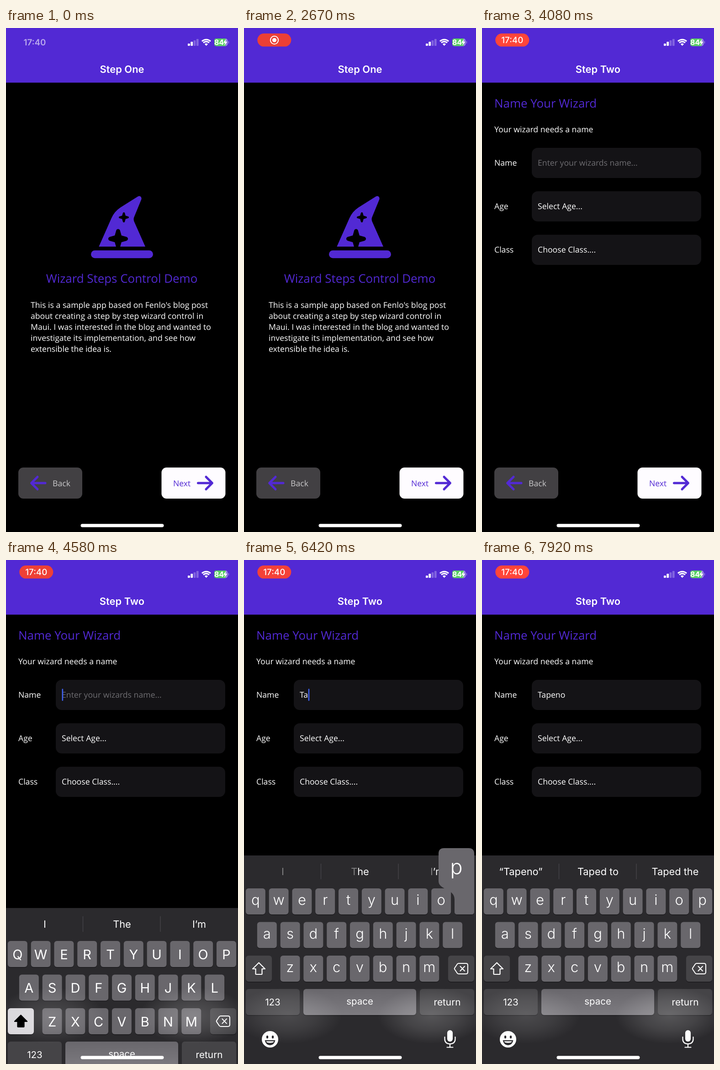
These frames come from a looping animation (508 by 1102 pixels, 8 s). An HTML page:

```html
<!DOCTYPE html>
<html lang="en">
<head>
<meta charset="utf-8">
<title>Wizard steps demo</title>
<style>
html, body { margin: 0; width: 100%; height: 100%; overflow: hidden; background: #000; }
svg { display: block; width: 100vw; height: 100vh; }
.ui { font-family: Inter, Roboto, sans-serif; }
.body { font-family: "Open Sans", "Noto Sans", sans-serif; }
text { white-space: pre; text-rendering: geometricPrecision; }
</style>
</head>
<body>
<svg id="stage" viewBox="0 0 508 1102" preserveAspectRatio="none"></svg>
<script>
const LOOP = 8000, PURPLE = '#5229d4', KEY = '#69676c', DARK_KEY = '#454447';
const BODY_SIZE = 17.65, HEADING_SIZE = 25.9;
const KEYBOARD_HEIGHT = 456, KEYBOARD_START = 4432;
const svg = document.getElementById('stage');
const $ = id => document.getElementById(id);

const clamp = v => Math.max(0, Math.min(1, v));
const ramp = (t, from, to) => clamp((t - from) / (to - from));
const smooth = p => p * p * (3 - 2 * p);

// Markup helpers
const rect = (x, y, w, h, r, fill, extra = '') =>
  `<rect x="${x}" y="${y}" width="${w}" height="${h}" rx="${r}" fill="${fill}" ${extra}/>`;
const label = (x, y, size, str, fill = '#fff', extra = '') =>
  `<text x="${x}" y="${y}" font-size="${size}" fill="${fill}" ${extra}>${str}</text>`;
const body = (x, y, str, fill, size = BODY_SIZE, extra = '') =>
  label(x, y, size, str, fill, `class="body" ${extra}`);
const ui = (x, y, size, str, fill, extra = '') =>
  label(x, y, size, str, fill, `class="ui" text-anchor="middle" ${extra}`);
const line = (d, color, width, extra = '') =>
  `<path d="${d}" fill="none" stroke="${color}" stroke-width="${width}" stroke-linecap="round" stroke-linejoin="round" ${extra}/>`;

function star(cx, cy, r) {
  const points = [];
  for (let i = 0; i < 8; i++) {
    const d = r * (i % 2 ? 0.255 : 0.8), a = i * Math.PI / 4;
    points.push(`${cx + d * Math.cos(a)},${cy + d * Math.sin(a)}`);
  }
  return `<polygon points="${points.join(' ')}" stroke="#000" stroke-width="${r * 0.4}" stroke-linejoin="round"/>`;
}

// Keyboard layout
const ROWS = [['qwertyuiop', 25.3, 718], ['asdfghjkl', 50.3, 791.5], ['zxcvbnm', 101, 865]];
const keys = ROWS.flatMap(([chars, x, y]) =>
  [...chars].map((ch, i) => ({ ch, x: x + i * 50.8, y })));

const keyCap = (x, y, w, fill, extra) =>
  rect(x, y + 1.5, w, 57, 6, '#1b1a1d') + rect(x, y, w, 57, 6, fill, extra);

function bubblePath({ x, y }) {
  const kl = x - 21.5, kr = x + 21.5, top = y - 88, bottom = y + 57;
  const br = Math.min(x + 39, 504), l = x > 470 ? kr - 78 : x - 39;
  return `M${l + 12} ${top}H${br - 12}Q${br} ${top} ${br} ${top + 12}V${y - 16}` +
    `C${br} ${y + 4} ${kr} ${y} ${kr} ${y + 24}V${bottom - 6}Q${kr} ${bottom} ${kr - 6} ${bottom}` +
    `H${kl + 6}Q${kl} ${bottom} ${kl} ${bottom - 6}V${y + 24}` +
    `C${kl} ${y} ${l} ${y + 4} ${l} ${y - 16}V${top + 12}Q${l} ${top} ${l + 12} ${top}Z`;
}
const bubbleCenter = k => k.x > 470 ? k.x - 17.5 : k.x;

// Static scene
const intro = [
  "This is a sample app based on Fenlo's blog post",
  'about creating a step by step wizard control in',
  'Maui. I was interested in the blog and wanted to',
  'investigate its implementation, and see how',
  'extensible the idea is.'
].map((s, i) => body(54, 612 + i * 24, s)).join('');

const pageOne = `<g id="pageOne">
  <path fill="${PURPLE}" d="M203.3 478L231 415.5Q237.5 401 250.5 392.5L289 368.3C293 365.8 298 369.5 296.3 375L280.3 414Q278.7 418 280.5 423L305 478Z"/>
  ${star(245.5, 461, 21.5)}${star(258, 414, 11)}
  ${rect(186, 486.3, 136, 17, 8.5, PURPLE)}
  ${body(253.5, 557, 'Wizard Steps Control Demo', PURPLE, HEADING_SIZE, 'text-anchor="middle"')}
  ${intro}</g>`;

const field = (y, name, value, fill, extra) =>
  body(27, y + 39, name) + rect(109, y, 371, 66, 13, '#141316') +
  body(122, y + 39, value, fill, BODY_SIZE, extra);

const pageTwo = `<g id="pageTwo">
  ${body(27, 174, 'Name Your Wizard', PURPLE, HEADING_SIZE)}
  ${body(27, 228, 'Your wizard needs a name')}
  ${field(262, 'Name', '', '#6e6d71', 'id="name"')}
  ${field(357, 'Age', 'Select Age...')}
  ${field(452, 'Class', 'Choose Class....')}
  ${rect(122, 281.5, 2.6, 26.5, 1.3, '#3f62f2', 'id="caret"')}</g>`;

const buttons =
  rect(27, 961, 140, 68, 11, '#424043') + body(102, 1002, 'Back', '#c9c8ca') +
  line('M86 995H56M69 981.5L55.5 995L69 1008.5', PURPLE, 5) +
  rect(340.5, 961, 140, 68, 11, '#fefcff') + body(366, 1002, 'Next', PURPLE) +
  line('M420.5 995H451M438 981.5L451.5 995L438 1008.5', PURPLE, 5);

const wifiArc = r => {
  const d = r * 0.68, y = 39 - r;
  return `<path d="M${438.5 - d} ${y + r * 0.28}Q438.5 ${y - r * 0.24} ${438.5 + d} ${y + r * 0.28}" fill="none" stroke="#fff" stroke-width="3.1"/>`;
};
const wifi = '<path d="M434.8 35Q438.5 32 442.2 35L438.5 39Z" fill="#fff"/>' + wifiArc(9.5) + wifiArc(14);

const header = rect(0, 0, 508, 119.5, 0, PURPLE) +
  [5, 9, 12, 15].map((h, i) =>
    rect(398 + i * 6.3, 39 - h, 4.8, h, 1.2, '#fff', i > 1 ? 'opacity=".28"' : '')).join('') + wifi +
  rect(456, 23, 29.5, 16.5, 5, '#9a86e2') +
  '<path d="M461 23H481V39.5H461Q456 39.5 456 34.5V28Q456 23 461 23Z" fill="#58cf63"/>' +
  rect(486.5, 28.5, 1.8, 5.5, 1, '#8a74de') +
  ui(466.5, 37, 16, '84', '#fff', 'font-weight="700"') +
  '<path d="M481.5 24.5L475.5 32.5H479.5L478 38.5L484.5 30H480.5Z" fill="#fff"/>' +
  ui(254, 98, 21.9, '', '#fff', 'id="title" font-weight="600"') +
  ui(63, 38, 18.8, '17:40', '#fff', 'id="clock" font-weight="600"') +
  `<g id="pill">${rect(29.3, 12, 74, 28.6, 14.3, '#f44', 'id="pillFill"')}
    ${ui(66.3, 33, 18.8, '17:40', '#fff', 'id="pillClock" font-weight="500"')}
    <g id="record"><circle cx="66.5" cy="26.5" r="8.7" fill="none" stroke="#fff" stroke-width="2"/>
    <circle cx="66.5" cy="26.5" r="4.6" fill="#fff"/></g></g>`;

const glow = [[97, 0.15], [410, 0.2]].map(([x, o]) =>
  `<ellipse cx="${x}" cy="996" rx="118" ry="62" fill="url(#glow)" opacity="${o}"/>`).join('');

const SHIFT_ARROW = 'M32.5 880.5L46 894H39.5V904.5Q39.5 906 38 906H27Q25.5 906 25.5 904.5V894H19Z';
const keyboard = `<g id="keyboard">
  ${rect(0, 646, 508, KEYBOARD_HEIGHT + 4, 0, '#2b2a2d')}
  ${[168.5, 338].map(x => rect(x - 0.6, 664, 1.2, 34, 0, '#49484c')).join('')}
  ${keys.map(k => keyCap(k.x - 21.5, k.y, 43, KEY)).join('')}
  ${keyCap(4, 865, 57, DARK_KEY, 'id="shift"')}${keyCap(447, 865, 57, DARK_KEY)}
  ${keyCap(4, 938, 118, DARK_KEY)}${keyCap(130, 938, 247, 'url(#spaceFill)')}${keyCap(385, 938, 119, DARK_KEY)}
  <g id="glowLayer">${glow}</g>
  ${[85, 254, 423].map((x, i) => ui(x, 689, 21.8, '', '#fff', `id="hint${i}"`)).join('')}
  <g id="letters">${keys.map(k => ui(k.x, 0, 0, '', '#fff')).join('')}</g>
  ${line(SHIFT_ARROW, '#fff', 2.2, 'id="shiftArrow"')}
  ${line('M470 882H486Q490 882 490 886V901Q490 905 486 905H470Q468.5 905 467 903.5L461 894.5Q460.5 893.5 461 892.5L467 883.5Q468.5 882 470 882ZM473.5 888.5L483 898.5M483 888.5L473.5 898.5', '#fff', 2)}
  ${ui(63, 974, 20.5, '123', '#fff')}${ui(253.5, 972, 20.5, 'space', '#fff')}${ui(445, 974, 20.8, 'return', '#fff')}
  <circle cx="57" cy="1048" r="18" fill="#fff"/>
  ${[51, 63].map(x => `<ellipse cx="${x}" cy="1043" rx="2.2" ry="3.3" fill="#2b2a2d"/>`).join('')}
  <path d="M45.5 1050H68.5Q66 1061 57 1061T45.5 1050Z" fill="#2b2a2d"/>
  <path d="M48.5 1052.2H65.5L64 1054.8Q57 1056.5 50 1054.8Z" fill="#fff"/>
  ${rect(445, 1028, 12, 25, 6, '#fff')}
  ${line('M439.5 1043V1047Q439.5 1058 451 1058T462.5 1047V1043M451 1058V1065M444.5 1065.5H457.5', '#fff', 2.2)}
  <g id="popup"><path id="bubble" fill="${KEY}"/>${ui(0, 0, 45, '', '#fff', 'id="popupLetter" font-weight="300"')}</g>
</g>`;

svg.innerHTML = `<defs>
  <radialGradient id="glow"><stop offset="0" stop-color="#fff"/><stop offset=".5" stop-color="#fff" stop-opacity=".6"/><stop offset="1" stop-color="#fff" stop-opacity="0"/></radialGradient>
  <linearGradient id="spaceFill" x2="0" y2="1"><stop offset="0" stop-color="#69676c"/><stop offset="1" stop-color="#7d7b80"/></linearGradient>
  </defs>${rect(0, 0, 508, 1102, 0, '#000')}${pageOne}${pageTwo}${buttons}${header}${keyboard}
  ${rect(163.5, 1084.2, 182, 7.2, 3.6, '#fff')}`;

// Typing: each key is pressed, then its letter lands on release
const strokes = [['T', 5950, 6040], ['a', 6180, 6270], ['p', 6370, 6480],
  ['e', 6700, 6790], ['n', 6960, 7050], ['o', 7250, 7340]];
const hints = [[0, 'I', 'The', 'I’m'], [6530, '“Tap”', 'Tape', 'Taps'],
  [6850, '“Tape”', 'Tapes', 'Taped'], [7480, '“Tapeno”', 'Taped to', 'Taped the']];

const set = (id, attrs) => {
  for (const k in attrs) $(id).setAttribute(k, attrs[k]);
};
const setText = (el, str) => { if (el.textContent !== str) el.textContent = str; };

function drawStatus(t) {
  set('clock', { opacity: 0.6 * (1 - ramp(t, 30, 200)) });
  set('pill', { opacity: ramp(t, 250, 550) });
  const pulse = Math.pow((1 + Math.cos((t - 7920) / 1950 * 2 * Math.PI)) / 2, 0.6);
  const mix = (a, b) => Math.round(a + (b - a) * pulse);
  set('pillFill', { fill: `rgb(${mix(217, 255)},${mix(57, 69)},${mix(50, 58)})` });
  set('pillClock', { opacity: ramp(t, 3010, 3330) });
  set('record', { opacity: 1 - ramp(t, 3060, 3330) });
  setText($('title'), t < 3170 ? 'Step One' : 'Step Two');
}

function drawPages(t) {
  const shift = 508 * smooth(ramp(t, 2700, 3090));
  set('pageOne', { transform: `translate(${-shift})` });
  set('pageTwo', { transform: `translate(${508 - shift})` });
}

function drawName(t) {
  const landed = strokes.filter(s => t >= s[2]);
  const typed = landed.map(s => s[0]).join('');
  const name = $('name');
  setText(name, typed || 'Enter your wizards name...');
  set('name', { fill: typed ? '#fff' : '#6e6d71' });
  const since = t - (typed ? landed[landed.length - 1][2] : 4450);
  const visible = since >= 0 && since % 1000 < (typed ? 500 : 560);
  set('caret', { x: 122.5 + (typed ? name.getComputedTextLength() : 0), opacity: +visible });
}

function drawKeyboard(t) {
  const s = Math.max(0, t - KEYBOARD_START) * 0.018;
  const left = (1 + s) * Math.exp(-s);
  const offset = KEYBOARD_HEIGHT * left;
  set('keyboard', { transform: `translate(0 ${offset})`, visibility: t < KEYBOARD_START ? 'hidden' : 'visible' });
  set('glowLayer', { transform: `translate(0 ${-offset})`, opacity: ramp(1 - left, 0.4, 0.7) });

  const upper = t < strokes[0][2];
  set('shift', { fill: upper ? '#d9d7db' : DARK_KEY });
  set('shiftArrow', { fill: upper ? '#000' : 'none', stroke: upper ? '#000' : '#fff' });
  [...$('letters').children].forEach((el, i) => {
    const k = keys[i];
    setText(el, upper ? k.ch.toUpperCase() : k.ch);
    el.setAttribute('y', k.y + (upper ? 40 : 36));
    el.setAttribute('font-size', upper ? 29 : 31);
    el.setAttribute('font-weight', upper ? 400 : 300);
  });

  const row = hints.filter(h => t >= h[0]).pop();
  const fading = t > 6320 && t < hints[1][0];
  for (let i = 0; i < 3; i++) {
    const str = row[i + 1], el = $('hint' + i);
    if (fading) {
      el.innerHTML = `<tspan fill-opacity="${1 - ramp(t, 6320, 6490)}">${str[0]}</tspan>` +
        `<tspan fill-opacity="${1 - ramp(t, 6420, 6530)}">${str.slice(1)}</tspan>`;
    } else if (el.children.length || el.textContent !== str) el.textContent = str;
  }

  const stroke = strokes.find(([, down, up]) => t >= down && t < up);
  set('popup', { display: stroke ? 'inline' : 'none' });
  if (stroke) {
    const key = keys.find(k => k.ch === stroke[0].toLowerCase());
    set('bubble', { d: bubblePath(key) });
    set('popupLetter', { x: bubbleCenter(key), y: key.y - 31 });
    setText($('popupLetter'), stroke[0]);
  }
}

function draw(t) {
  drawStatus(t);
  drawPages(t);
  drawName(t);
  drawKeyboard(t);
}

const start = performance.now();
function tick() {
  draw((performance.now() - start) % LOOP);
  requestAnimationFrame(tick);
}
tick();
</script>
</body>
</html>
```
